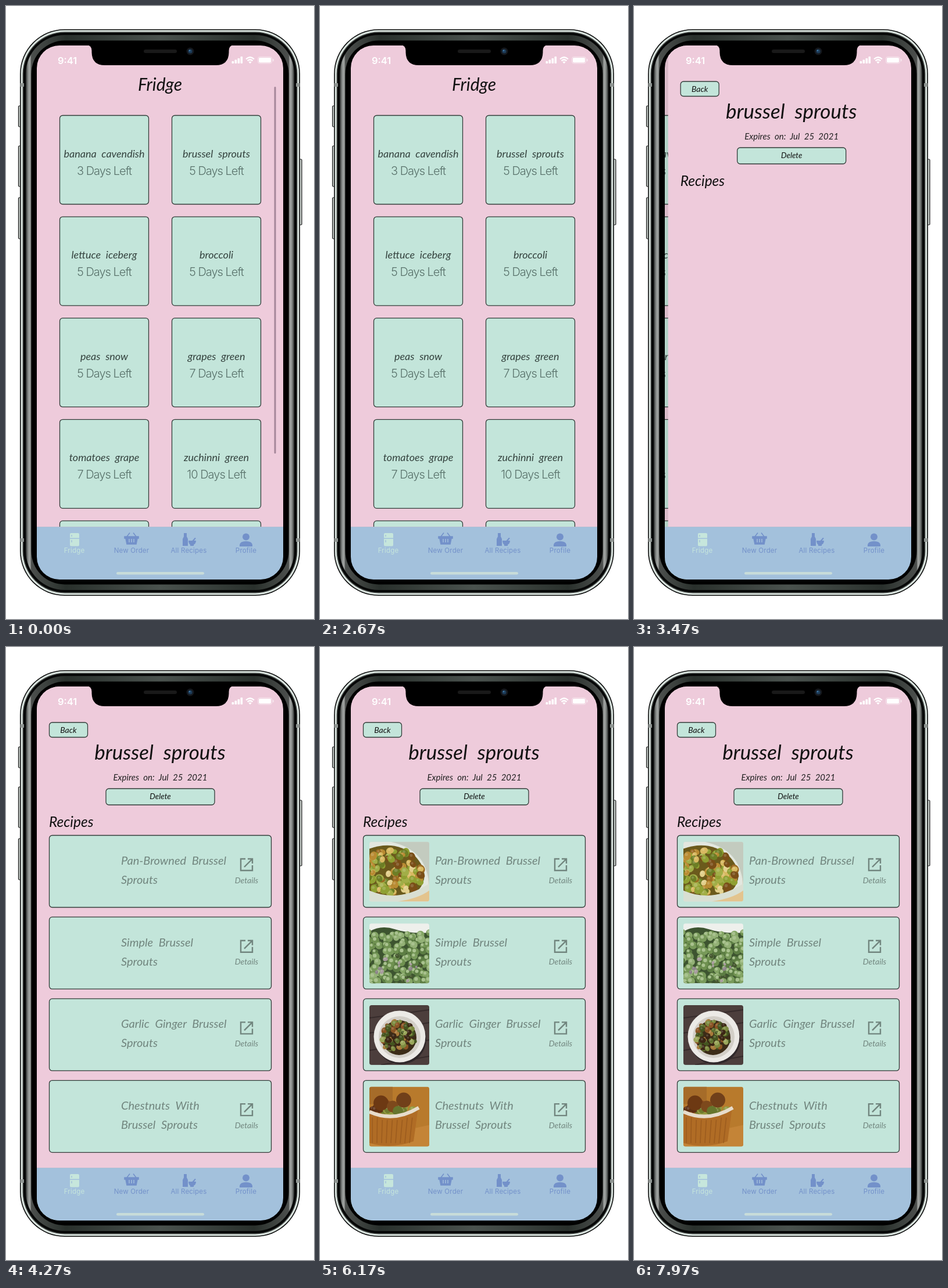
An HTML page for the animation above (8 s loop, 530 by 1056 pixels).

```html
<!DOCTYPE html>
<html lang="en">
<head>
<meta charset="utf-8">
<title>Fridge app</title>
<style>
html, body { margin: 0; width: 100%; height: 100%; overflow: hidden; background: #fff; }
svg { display: block; }
.hand { font-family: Lato, "Open Sans", sans-serif; font-style: italic; word-spacing: .25em; }
.ui { font-family: Inter, Roboto, sans-serif; }
.mid { text-anchor: middle; }
.days { font-size: 20px; font-weight: 300; letter-spacing: -1px; fill: #58716a; }
.tab { font-size: 11.5px; letter-spacing: .2px; }
.box { fill: #c3e5da; stroke: #323c39; stroke-width: 1.3; }
</style>
</head>
<body>
<svg id="stage" width="530" height="1056" viewBox="0 0 530 1056"></svg>
<script>
const PINK = '#eecbdb', MINT = '#c6e6dc', BLUE = '#7391ca', BAR = '#a3c1dc';
const LOOP = 8000, WIDTH = 424;

const rect = (x, y, w, h, r, attrs) =>
  `<rect x="${x}" y="${y}" width="${w}" height="${h}" rx="${r}" ${attrs}/>`;
const box = (x, y, w, h) => rect(x, y, w, h, 5, 'class="box"');
const circle = (x, y, r, fill) => `<circle cx="${x}" cy="${y}" r="${r}" fill="${fill}"/>`;
const path = (d, attrs) => `<path d="${d}" ${attrs}/>`;
const hand = (x, y, size, text, fill = '#111', cls = '') =>
  `<text x="${x}" y="${y}" font-size="${size}" fill="${fill}" class="hand ${cls}">${text}</text>`;

function seeded(seed) {
  return () => (seed = (seed * 16807) % 2147483647) / 2147483647;
}

// Scattered round pieces inside an ellipse, each with a small highlight.
function pieces(seed, count, cx, cy, rx, ry, size, colors) {
  const rnd = seeded(seed);
  let out = '';
  for (let i = 0; i < count; i++) {
    const a = rnd() * Math.PI * 2, d = Math.sqrt(rnd());
    const x = cx + Math.cos(a) * d * rx, y = cy + Math.sin(a) * d * ry;
    const r = size * (.65 + rnd() * .6);
    const c = colors[Math.floor(rnd() * colors.length)];
    out += `<ellipse cx="${x.toFixed(1)}" cy="${y.toFixed(1)}" rx="${r.toFixed(1)}" ry="${(r * .8).toFixed(1)}"
      fill="${c}" transform="rotate(${Math.round(rnd() * 180)} ${x.toFixed(1)} ${y.toFixed(1)})"/>`
      + `<circle cx="${(x - r * .2).toFixed(1)}" cy="${(y - r * .3).toFixed(1)}" r="${(r * .35).toFixed(1)}" fill="#fff" opacity=".16"/>`;
  }
  return out;
}

function sproutStalks() {
  const rnd = seeded(77);
  const greens = ['#6f9150', '#84a565', '#5c7d43', '#93b176', '#789a5a'];
  let out = rect(0, 0, 103, 103, 0, 'fill="#eef0ec"')
    + path('M0 14Q20 2 44 10T103 16V103H0Z', 'fill="#3d5430"');
  for (let y = 14; y < 106; y += 10) {
    for (let x = -2; x < 108; x += 11) {
      const px = x + rnd() * 9, py = y + rnd() * 8, r = 5 + rnd() * 2.5;
      out += circle(px, py, r, greens[Math.floor(rnd() * 5)]) + circle(px - 1.5, py - 2, r * .45, '#a9c28f');
    }
  }
  return out + pieces(9, 16, 50, 78, 48, 24, 3.5, ['#8d8589', '#a79c9d', '#45572f']);
}

const photos = [
  rect(0, 0, 103, 103, 0, 'fill="#d6d8c8"')
    + path('M0 0H103V70Q96 24 60 10Q26 2 0 18Z', 'fill="#c3cbbf"')
    + path('M36 0Q94 12 101 64L103 103H0V0Z', 'fill="#e3e7df"')
    + path('M0 12Q44 -4 78 24Q108 56 84 84Q50 108 0 86Z', 'fill="#6b5a1c"')
    + pieces(41, 115, 40, 52, 51, 39, 7, ['#b98b32', '#d8b961', '#8fa032', '#7a4e17', '#e2cf8b', '#a2ae47', '#9a6a22', '#6d7e25'])
    + path('M0 84Q50 106 103 72V103H0Z', 'fill="#d9dfd2"')
    + path('M48 103Q84 98 103 84V103Z', 'fill="#e3c48e"'),
  sproutStalks(),
  rect(0, 0, 103, 103, 0, 'fill="#4c3e3c"')
    + path('M0 22L103 8M0 48L103 30M0 78L103 60M20 103L103 88', 'stroke="#362b2b" stroke-width="2"')
    + circle(54, 58, 44, '#30282a') + circle(52, 54, 44.5, '#eceae6') + circle(52, 55, 36, '#d3cfc8')
    + circle(51, 56, 30, '#3c2c18')
    + pieces(23, 72, 51, 56, 29, 28, 5, ['#5f7030', '#7c8a3f', '#8a5424', '#3b2614', '#a77a3a', '#44541f', '#9aa65a']),
  rect(0, 0, 103, 103, 0, 'fill="#b87a2c"') + path('M0 88L103 66V103H0Z', 'fill="#c48437"')
    + path('M0 0H40V30H0Z', 'fill="#a66c29"')
    + path('M0 36Q42 56 84 36L76 94Q38 108 0 97Z', 'fill="#b06c25"')
    + Array.from({ length: 9 }, (_, i) => path(`M${5 + i * 8.6} ${i < 2 || i > 6 ? 53 : 57}L${5 + i * 8} 97`, 'stroke="#8f521b" stroke-width="1.6" opacity=".6"')).join('')
    + pieces(15, 22, 38, 39, 37, 9, 8, ['#6f7b2d', '#8b4c1c', '#b9b46b', '#5d3014', '#93993f'])
    + circle(20, 28, 13, '#6d3913') + circle(59, 23, 13, '#71401a') + circle(40, 34, 10, '#7d491c') + circle(49, 42, 9, '#66752d')
    + path('M0 43Q42 62 85 36', 'fill="none" stroke="#e7dccb" stroke-width="6"')
];

function fridgePage() {
  const foods = ['banana cavendish:3', 'brussel sprouts:5', 'lettuce iceberg:5', 'broccoli:5', 'peas snow:5',
    'grapes green:7', 'tomatoes grape:7', 'zuchinni green:10', 'carrots:10', 'celery:10'];
  const cards = foods.map((food, i) => {
    const [name, days] = food.split(':');
    const x = i % 2 ? 285.5 : 92.5, y = 188.5 + Math.floor(i / 2) * 174.6;
    return `<g id="food${i}">` + box(x, y, 153, 153)
      + hand(x + 76.5, y + 72, 18, name, '#34423e', 'mid')
      + `<text x="${x + 76.5}" y="${y + 102}" class="ui mid days">${days} Days Left</text></g>`;
  }).join('');
  return '<g id="fridge">' + rect(53, 68, WIDTH, 830, 0, `fill="${PINK}"`)
    + hand(265, 146, 30, 'Fridge', '#111', 'mid') + cards
    + rect(461.5, 139, 3, 632, 1.5, 'id="scroll" fill="#a5879a"') + '</g>';
}

function recipeCard(lines, i) {
  const y = 324.5 + i * 140.7, grey = '#71857e';
  return box(74.5, y, 382, 124)
    + `<svg id="photo${i}" x="85" y="${y + 11}" width="103" height="103" viewBox="0 0 103 103"><g clip-path="url(#round)">${photos[i]}</g></svg>`
    + lines.map((s, k) => hand(198, y + 50.5 + k * 33, 20, s, grey)).join('')
    + path(`M412 ${y + 40.5}H404V${y + 60.5}H424V${y + 51.5}M416 ${y + 40.5}H424V${y + 48.5}M424 ${y + 40.5}L410 ${y + 54.5}`,
      `fill="none" stroke="${grey}" stroke-width="2.4"`)
    + hand(414, y + 82, 14, 'Details', grey, 'mid');
}

function detailPage() {
  const recipes = [['Pan-Browned Brussel', 'Sprouts'], ['Simple Brussel', 'Sprouts'],
    ['Garlic Ginger Brussel', 'Sprouts'], ['Chestnuts With', 'Brussel Sprouts']];
  return '<g id="detail">' + rect(47, 68, 6, 830, 0, 'fill="url(#edge)"')
    + rect(53, 68, WIDTH, 830, 0, `fill="${PINK}"`)
    + box(74.5, 130, 66, 25.5) + hand(107.5, 147.5, 14, 'Back', '#111', 'mid')
    + hand(265, 194, 35, 'brussel sprouts', '#111', 'mid')
    + hand(265.5, 230, 15, 'Expires on: Jul 25 2021', '#222', 'mid')
    + box(172, 244, 187, 28) + hand(265.5, 262, 13.5, 'Delete', '#111', 'mid')
    + hand(74, 310, 24.5, 'Recipes')
    + `<g id="recipes">${recipes.map(recipeCard).join('')}</g></g>`;
}

function tabBar() {
  const tabs = [[117.5, 'Fridge'], [216, 'New Order'], [314.5, 'All Recipes'], [413, 'Profile']];
  const labels = tabs.map(([x, s], i) =>
    `<text x="${x}" y="942" class="ui mid tab" fill="${i ? BLUE : MINT}">${s}</text>`).join('');
  return rect(53, 897, WIDTH, 92, 0, `fill="${BAR}"`) + rect(53, 897, WIDTH, 1, 0, 'fill="#b1bdd3"')
    + rect(110, 908, 16, 22.5, 2, `fill="${MINT}"`)
    + path('M110 917.2H126M113 911V914M113 920V924', `stroke="${BAR}" stroke-width="1.4"`)
    + path('M204 914H228V917H226L224 927H208L206 917H204ZM208 914L213 907.5M224 914L219 907.5', `fill="${BLUE}" stroke="${BLUE}" stroke-width="1.6"`)
    + path('M212 918V924M216 918V924M220 918V924', `stroke="${BAR}" stroke-width="1.5"`)
    + path('M306 908H311V914L313 918V930H304V918L306 914ZM314 921H327Q327 926 323 928V930H317V928Q314 926 314 921Z', `fill="${BLUE}"`)
    + path('M321 922L326 916.5', `stroke="${BLUE}" stroke-width="2"`)
    + circle(413, 914.5, 6, BLUE) + path('M402 931V928Q403 922 413 922T424 928V931Z', `fill="${BLUE}"`)
    + labels + rect(190, 975, 151, 4.6, 2.3, 'fill="#c8dcd9"');
}

function statusBar() {
  const bars = [4, 6.5, 9, 12].map((h, i) => rect(388.5 + i * 5, 99 - h, 3.6, h, 1, 'fill="#fff"')).join('');
  return '<text x="89" y="99.5" class="ui" font-size="16.5" font-weight="600" fill="#fff">9:41</text>' + bars
    + path('M413 91.5Q420 85 427 91.5M415.5 94.5Q420 90.5 424.5 94.5', 'fill="none" stroke="#fff" stroke-width="2.2"')
    + path('M417.3 96.3Q420 94.5 422.7 96.3L420 99.3Z', 'fill="#fff"')
    + rect(433.5, 87.5, 24, 11.5, 3.5, 'fill="none" stroke="#fff" stroke-opacity=".5"')
    + rect(435, 89, 21, 8.5, 2, 'fill="#fff"') + rect(459, 91, 1.6, 4.5, .8, 'fill="#fff" opacity=".6"');
}

function phoneBody() {
  const button = (x, y, h) => rect(x, y, 6, h, 1.5, 'fill="#c9d0cc" stroke="#161616" stroke-width="1.2"');
  const layer = (d, fill) => rect(24 + d, 40 + d, 482 - 2 * d, 976 - 2 * d, 77 - d, `fill="${fill}"`);
  const marks = [136, 920].map(y => rect(24.5, y - 3, 6.5, 6, 0, 'fill="#8f9592"') + rect(499, y - 3, 6.5, 6, 0, 'fill="#8f9592"')).join('');
  return button(21.5, 172, 36) + button(21.5, 241, 70) + button(21.5, 330, 71) + button(503, 264, 113)
    + layer(0, '#0c0d0d') + layer(1.6, '#dbe5e0') + layer(4.6, '#454947') + layer(6, '#060707')
    + layer(10, 'url(#metal)') + layer(19.5, '#000') + marks;
}

const notch = path('M139 67Q147.500 68 147.500 77V80Q148 102 170 102H361Q383 102 383.500 80V77Q383.500 68 392 67Z', 'fill="#000"')
  + rect(237, 75, 57, 6, 3, 'fill="#191919"') + circle(317, 78, 6.5, '#15181d') + circle(317, 78, 3.6, '#1d3b58') + circle(316, 76.800, 1.4, '#4078a3');

const stops = list => list.map(([o, c, a = 1]) => `<stop offset="${o}" stop-color="${c}" stop-opacity="${a}"/>`).join('');
const $ = id => document.getElementById(id);

$('stage').innerHTML = `<defs>
  <linearGradient id="metal">${stops([[0, '#2a2c2b'], [.009, '#8d918f'], [.016, '#a2a5a3'], [.021, '#4c4f4d'], [.15, '#29302c'],
    [.5, '#4a524e'], [.85, '#29302c'], [.979, '#4c4f4d'], [.984, '#a2a5a3'], [.991, '#8d918f'], [1, '#2a2c2b']])}</linearGradient>
  <linearGradient id="edge">${stops([[0, '#000', 0], [1, '#000', .05]])}</linearGradient>
  <clipPath id="screen">${rect(53, 68, WIDTH, 920, 39, '')}</clipPath>
  <clipPath id="round">${rect(0, 0, 103, 103, 4, '')}</clipPath></defs>`
  + phoneBody()
  + `<g clip-path="url(#screen)">${fridgePage()}${rect(53, 68, WIDTH, 830, 0, 'id="dim" fill="#000"')}${detailPage()}${tabBar()}</g>`
  + notch + statusBar();

// Linear interpolation through [time, value] steps.
function track(steps, t) {
  if (t <= steps[0][0]) return steps[0][1];
  for (let i = 1; i < steps.length; i++) {
    const [t0, v0] = steps[i - 1], [t1, v1] = steps[i];
    if (t < t1) return v0 + (v1 - v0) * (t - t0) / (t1 - t0);
  }
  return steps[steps.length - 1][1];
}

const scrollFade = [[600, 1], [900, 0]];
const tapFade = [[2820, 1], [2970, .28], [3090, .28], [3340, 1]];
const photoTimes = [5370, 4370, 4370, 4470];
const PUSH = 2945, SETTLE = 3570, LIST = 4070;

function push(t) {
  if (t <= PUSH) return 0;
  if (t >= SETTLE) return 1;
  const k = (t - PUSH) * .012;
  return 1 - (1 + k) * Math.exp(-k);
}

const show = (id, on) => $(id).setAttribute('visibility', on ? 'visible' : 'hidden');

function draw(time) {
  const t = Math.max(0, Math.floor((time + 30) / 100) * 100 - 30);
  const p = push(t);
  $('fridge').setAttribute('transform', `translate(${-.3 * WIDTH * p} 0)`);
  $('detail').setAttribute('transform', `translate(${WIDTH * (1 - p)} 0)`);
  show('detail', p > 0);
  $('dim').setAttribute('opacity', .06 * p);
  $('scroll').setAttribute('opacity', track(scrollFade, t));
  $('food1').setAttribute('opacity', track(tapFade, t));
  const listed = t >= LIST;
  show('recipes', listed);
  photoTimes.forEach((at, i) => show('photo' + i, listed && t >= at));
}

const start = performance.now();
function tick() {
  draw((performance.now() - start) % LOOP);
  requestAnimationFrame(tick);
}
tick();
</script>
</body>
</html>
```
